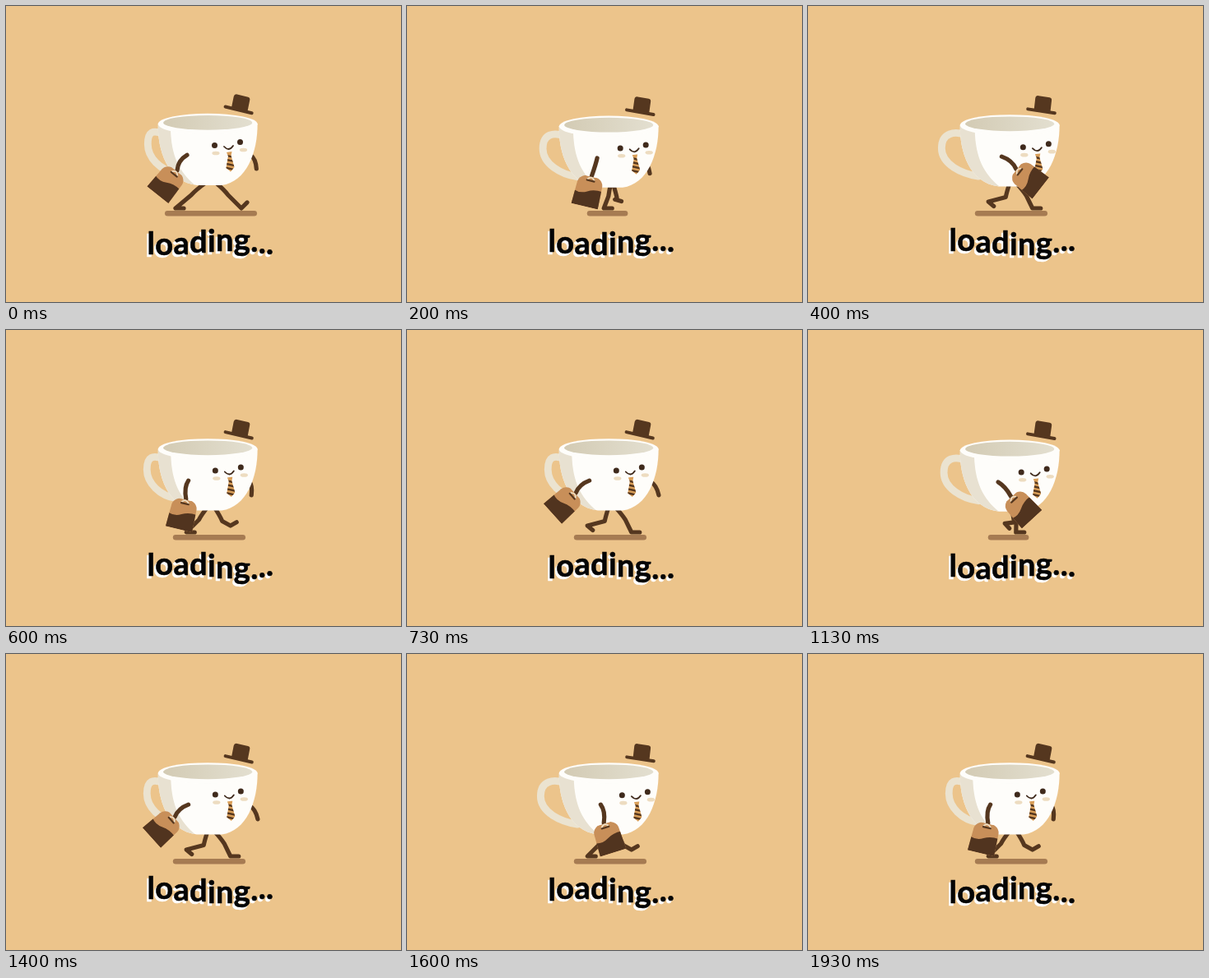
An HTML page for the animation above (1990 ms loop, 480 by 360 pixels).

```html
<!DOCTYPE html>
<html lang="en">
<head>
<meta charset="utf-8">
<title>Loading</title>
<style>
  html, body { margin: 0; width: 100%; height: 100%; overflow: hidden; background: #ecc48b; }
  svg { display: block; width: 100vw; height: 100vh; }
  .line { fill: none; stroke: #55371f; stroke-width: 5.2; stroke-linecap: round; stroke-linejoin: round; }
  .dark { fill: #55371f; }
  .word { font: 700 38px Lato, "Noto Sans", sans-serif; letter-spacing: .36px; stroke-width: .6; }
</style>
</head>
<body>
<svg viewBox="0 0 480 360">
  <defs>
    <path id="bowl" d="M184.8 143 C184 175 196 214 232 218 H262 C292 214 306 178 305.6 143Z"/>
    <clipPath id="bowlClip"><use href="#bowl"/></clipPath>
    <clipPath id="tieClip"><path d="M268 178 L274.5 177 L273.5 182 L277.5 196 L273 201.5 L267.5 197 L270 182.5Z"/></clipPath>
    <clipPath id="bagClip"><path d="M-8 1 H8 Q15 4 15.5 10 L16.5 38 H-16.5 L-15.5 10 Q-15 4 -8 1Z"/></clipPath>
    <linearGradient id="inside">
      <stop offset="0" stop-color="#d3cbb4"/>
      <stop offset="1" stop-color="#e3dfd0"/>
    </linearGradient>
  </defs>

  <path id="shadow" fill="none" stroke="#a67b52" stroke-width="6.6" stroke-linecap="round"/>
  <path id="farArm" class="line"/>
  <path id="ear" fill="none" stroke="#ebe3d0" stroke-width="8.8" stroke-linecap="round"/>
  <path id="farLeg" class="line"/>
  <path id="nearLeg" class="line"/>

  <g id="cup">
    <use href="#bowl" fill="#fefdfa"/>
    <g clip-path="url(#bowlClip)"><path id="shade" fill="#e8e1d1"/></g>
    <ellipse cx="245.2" cy="143.5" rx="60.4" ry="12.8" fill="#fefdfa"/>
    <ellipse cx="245.2" cy="141.9" rx="54" ry="8.9" fill="url(#inside)"/>
  </g>

  <g id="face">
    <g fill="#eddcc0">
      <ellipse cx="255" cy="179" rx="4.6" ry="2.3"/>
      <ellipse cx="288.5" cy="175" rx="4.6" ry="2.3"/>
    </g>
    <g fill="#3f2a1c">
      <circle cx="253.5" cy="169.6" r="3.5"/>
      <circle cx="284.5" cy="165.6" r="3.5"/>
    </g>
    <path d="M265 171 Q271 177.5 276 170" fill="none" stroke="#3f2a1c" stroke-width="1.8" stroke-linecap="round"/>
    <g clip-path="url(#tieClip)">
      <path d="M264 175 h18 v30 h-18z" fill="#d99e58"/>
      <path d="M264 181 l18 4 m-18 1 l18 4 m-18 1 l18 4 m-18 1 l18 4 m-18 1 l18 4" stroke="#55371f" stroke-width="2.4"/>
    </g>
  </g>

  <g id="hat" class="dark">
    <path d="M-9 0 L-9.5 -14.5 Q-9.5 -18 -6 -18 H7.5 Q10.5 -18 10.5 -14.5 L11 0Z"/>
    <rect x="-18.5" y="-2" width="37" height="4" rx="2"/>
  </g>

  <path id="nearArm" class="line"/>
  <g id="bag">
    <g clip-path="url(#bagClip)">
      <path d="M-20 -2 H20 V40 H-20Z" fill="#c88f59"/>
      <path d="M-17 21 Q-9 24 -1 19.5 T17 16 V40 H-17Z" fill="#51341f"/>
    </g>
    <path d="M-4.5 5 Q0 -1 4.5 5" fill="none" stroke="#efdfc4" stroke-width="1.8"/>
    <path d="M-4.5 6 H4.5" class="line" style="stroke-width:2.2"/>
  </g>

  <text id="under" class="word" fill="#fff" stroke="#fff">loading...</text>
  <text id="over" class="word" fill="#050505" stroke="#050505">loading...</text>
</svg>

<script>
const LOOP = 1990, STEPS = 30, STRIDES = 3;

const $ = id => document.getElementById(id);
const set = (id, name, value) => $(id).setAttribute(name, value);
const mix = (a, b, k) => a + (b - a) * k;
const cos = turns => Math.cos(2 * Math.PI * turns);
const sin = turns => Math.sin(2 * Math.PI * turns);
const startOf = n => Math.round(n * 20 / 3) * 10;

// First half of q: the foot slides back on the ground; second half: it swings forward.
function drawLeg(id, phase, bob) {
  const q = phase % 1;
  const swing = Math.max(0, 2 * q - 1);
  const lift = Math.sin(Math.PI * swing) ** .6 || 0;
  const hip = { x: 249 + 5 * cos(q), y: 214 + bob };
  const ankle = { x: 246 + 35 * cos(q) + 5 * cos(3 * q), y: 246 - 11 * lift };
  const knee = {
    x: (hip.x + ankle.x) / 2 + (15 - 19 * swing) * lift + (q < .5 ? 2.5 * Math.abs(sin(2 * q)) : 0),
    y: (hip.y + ankle.y) / 2 + 8 * lift
  };
  const tilt = swing ? 50 * sin(.75 * swing) : -45 * Math.max(0, 1 - 10 * q);
  const reach = 10 - 2 * lift, turn = tilt / 360;
  set(id, 'd', `M${hip.x} ${hip.y} Q${mix(hip.x, knee.x, .7)} ${mix(hip.y, knee.y, .6)} ${knee.x} ${knee.y}`
    + ` L${ankle.x} ${ankle.y} l${reach * cos(turn)} ${reach * sin(turn)}`);
}

function drawArms(p, twist, bob) {
  const lag = cos(p - .08);
  const shoulder = { x: 220 + 17 * twist, y: 181.3 + 1.3 * bob };
  const hand = { x: 229 - 24 * lag, y: 207 - 9 * lag * lag };
  const elbow = { x: (shoulder.x + hand.x) / 2 - 5 * cos(p), y: (shoulder.y + hand.y) / 2 - 3 };
  set('nearArm', 'd', `M${shoulder.x} ${shoulder.y} Q${elbow.x} ${elbow.y} ${hand.x} ${hand.y}`);
  set('bag', 'transform', `translate(${hand.x} ${hand.y}) rotate(${50 * cos(p - .1) - 2})`);

  const x = 297 - 17 * twist, y = 181 + 2 * bob, tip = 306 - 13.5 * (1 - lag);
  set('farArm', 'd', `M${x} ${y} Q${(x + tip) / 2 + 3} ${y + 5} ${tip} ${y + 17}`);
}

function drawCup(twist, bob) {
  const back = 1 - twist;
  const left = mix(172.3, 161.3, twist), low = mix(203, 206, twist);
  set('ear', 'd', `M190 155 C179 151 ${left} 152 ${left} ${mix(168, 172, twist)}`
    + ` C${left} ${mix(184, 192, twist)} 187 ${low - 3} 207 ${low}`);
  const edge = 200 + 3 * twist;
  set('shade', 'd', `M180 140 H${edge} V150 C${edge + 1} 185 ${edge + 12} 205 ${edge + 35} 222 H180Z`);
  for (const id of ['ear', 'cup']) set(id, 'transform', `translate(0 ${bob})`);
  set('face', 'transform', `translate(${8.7 * twist} ${bob + .8 * twist})`);
  set('hat', 'transform', `translate(${283.6 - back} ${126.4 + bob}) rotate(${8 + 5.5 * back})`);
}

function drawWord(t) {
  const crest = .6 + t / (LOOP / 2);
  const place = (id, dx, dy) => {
    const ys = Array.from({ length: 10 }, (_, i) => 300.2 + dy - 2.6 * cos(i / 9 - crest));
    set(id, 'x', 171.4 + dx);
    set(id, 'y', ys.join(' '));
  };
  place('under', -2.2, 3);
  place('over', 0, 0);
}

function draw(n) {
  const p = n * STRIDES / STEPS;
  const spread = cos(p) ** 2;
  const twist = (1 - cos(p)) / 2;
  const bob = 3 * Math.abs(sin(p)) ** 1.4;
  const mid = 243 + 6 * spread, half = 18.2 + 34.5 * spread;

  set('shadow', 'd', `M${mid - half} 252.2 H${mid + half}`);
  drawLeg('farLeg', p + .5, bob);
  drawLeg('nearLeg', p, bob);
  drawCup(twist, bob);
  drawArms(p, twist, bob);
  drawWord(startOf(n));
}

let shown = -1;
const origin = performance.now();
function tick() {
  const t = (performance.now() - origin) % LOOP;
  let n = STEPS - 1;
  while (startOf(n) > t) n--;
  if (n !== shown) draw(shown = n);
  requestAnimationFrame(tick);
}
tick();
</script>
</body>
</html>
```
